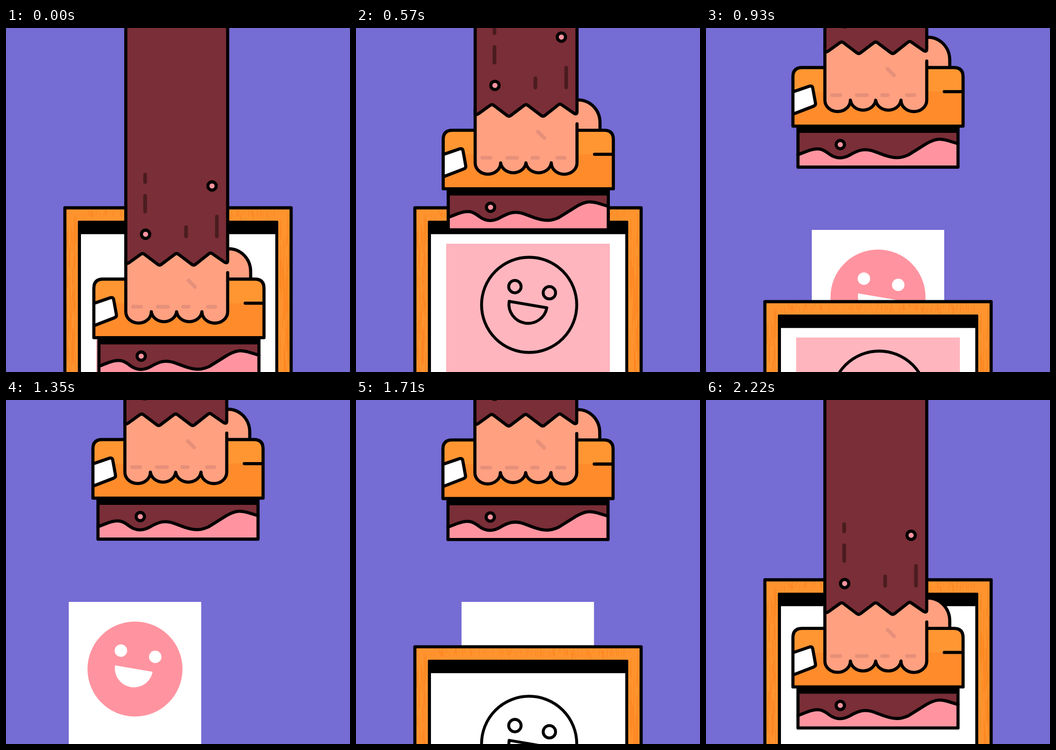
Recreate the animation shown at these times as an HTML page. Size 748x748 px, loop 2.25 s.

```html
<!DOCTYPE html>
<html lang="en">
<head>
<meta charset="utf-8">
<title>Screen printing</title>
<style>
  html, body { margin: 0; width: 100%; height: 100%; overflow: hidden; background: #756cd4; }
  svg { display: block; width: 100%; height: 100%; }
  .line { fill: none; stroke: #000; stroke-width: 6.8; stroke-linecap: round; stroke-linejoin: round; }
  .face { stroke-width: 6.3; }
  .dot { fill: #ff94a0; stroke: #000; stroke-width: 6.8; }
  .crease { fill: none; stroke-width: 8; stroke-linecap: round; }
</style>
</head>
<body>
<svg viewBox="0 0 748 748">
  <rect width="748" height="748" fill="#756cd4"/>

  <g id="print">
    <rect x="230" y="439" width="288" height="420" fill="#fff"/>
    <circle cx="374" cy="585" r="103.3" fill="#ff94a0"/>
    <g fill="#fff">
      <circle cx="343.3" cy="545" r="13.6"/>
      <circle cx="418" cy="558.5" r="13.6"/>
      <path d="M330.7 577L412.3 591A41.4 41.4 0 0 1 330.7 577Z"/>
    </g>
  </g>
  <rect id="blank" x="229.5" y="439" width="288" height="420" fill="#fff"/>

  <g id="frame">
    <rect x="128" y="391" width="492" height="900" fill="#ff942f"/>
    <path id="grain" fill="none" stroke="#fb7d16" stroke-opacity=".5" stroke-width="1.5"/>
    <rect class="line" x="128" y="391" width="492" height="900"/>
    <rect x="156.3" y="419" width="435.7" height="900" rx="2"/>
    <rect x="163" y="448.3" width="422.5" height="900" fill="#fff"/>
    <rect id="ink" x="196" y="469" width="356" height="900" fill="#ffb5bd"/>
    <g class="line face">
      <circle cx="376.5" cy="602" r="103.5"/>
      <circle cx="345.5" cy="562.3" r="13.5"/>
      <circle cx="420.5" cy="575.7" r="13.5"/>
      <path d="M333 594.3L415 608.3A41.6 41.6 0 0 1 333 594.3Z"/>
    </g>
  </g>

  <g id="hand">
    <!-- blade -->
    <rect x="200" y="216" width="348" height="86" fill="#7a2e37"/>
    <path id="wave" fill="#ff94a0"/>
    <path id="waveLine" class="line"/>
    <rect class="line" x="200" y="216" width="348" height="86.5"/>
    <rect x="197" y="213" width="354" height="15"/>
    <circle class="dot" cx="292" cy="253.5" r="9"/>

    <!-- thumb -->
    <path d="M470 20H480C508 20 530 42 530 70V92H470Z" fill="#ffa080"/>
    <path class="line" d="M482 20C509 20 530 42 530 70V86"/>

    <!-- handle -->
    <path d="M189 213V106Q189 86 209 86H539Q559 86 559 106V213Z" fill="#ff8b2b"/>
    <path d="M189 138.5V106Q189 86 209 86H539Q559 86 559 106V138.5Z" fill="#ff9632"/>
    <path class="line" style="fill:#fff" d="M190 138.5L225 126.5Q230.5 125 232 130L238 163Q239 168 234 170L190 187"/>
    <path class="line" d="M518 138.3H556M189 213.3V106Q189 86 209 86H539Q559 86 559 106V213.3Z"/>

    <!-- fist -->
    <path id="fist" fill="#ffa080"/>
    <path class="crease" stroke="#e6907a" d="M274 146H292M328 146H350M383 146H395M437 146H453M395 89L409 103"/>
    <path id="fistLine" class="line"/>

    <!-- sleeve -->
    <path id="sleeve" class="line" style="fill:#7a2e37"/>
    <path class="crease" stroke="#4a1c1f" d="M300.5-141V-125M300.5-95V-61M389.5-27V-7M456.5-50V-7"/>
    <circle class="dot" cx="446" cy="-116.5" r="9"/>
    <circle class="dot" cx="301.5" cy="-11.5" r="9"/>
  </g>
</svg>
<script>
const LOOP = 2250, STEP = 30;
const $ = id => document.getElementById(id);
const draw = (id, d) => $(id).setAttribute('d', d);
const move = (id, x, y) => $(id).setAttribute('transform', `translate(${x} ${y})`);
const ramp = (t, a, b) => Math.min(1, Math.max(0, (t - a) / (b - a)));

const wave = 'M200 275.5L222 267C245 259 254 263 268 274C283 285 297 285 313 276' +
  'C332 265 345 261 365 268L388 276.5C412 284.5 424 283 440 276L480 251C499 240.5 509 240 525 244.5L548 251.5';
draw('waveLine', wave);
draw('wave', wave + 'V302H200Z');

const knuckles = [314, 369, 424, 480].map(x => `A27.7 24.5 0 0 0 ${x} 157`).join('');
draw('fist', 'M258.5 20V157' + knuckles + 'V20Z');
draw('fistLine', 'M258.5 40V157' + knuckles + 'V72');
draw('sleeve', 'M258.5-540V52Q262 53 266 50L291 32Q295 29 299 32L328 54Q332 57 336 54L365 32Q369 29 373 32' +
  'L402 54Q406 57 410 54L439 31Q443 27.5 447 31L473 49Q480 53 480 46V-540');

// Wood grain: thin upright fibres along the two stiles and the top rail
let seed = 7;
const rand = () => (seed = seed * 16807 % 2147483647) / 2147483647;
const fibre = (x, y, len) => `M${x} ${y}q${rand() * 4 - 2} ${len / 2} 0 ${len}`;
let grain = '';
for (let i = 0; i < 100; i++) {
  grain += fibre(165 + rand() * 420, 395 + rand() * 10, 6 + rand() * 9);
  const side = i % 2 ? 133 : 595;
  grain += fibre(side + rand() * 20, 397 + rand() * 350, 20 + rand() * 50);
}
draw('grain', grain);

function render(t) {
  // The hand pulls up evenly, then drops with gathering speed
  const pull = 1 - ramp(t, 0, 810);
  const drop = ramp(t, 1680, LOOP) ** 2.1;
  const handY = 460 * (pull + drop);
  move('hand', 2 * pull, handY);

  move('frame', 0, 510 * (ramp(t, 810, 1110) - ramp(t, 1560, 1770)));
  $('ink').setAttribute('y', Math.max(469, handY + 218));
  $('ink').style.display = t < 1320 ? '' : 'none';

  const slide = 748 * ramp(t, 1320, 1560);
  move('print', -slide, 0);
  move('blank', 748 - slide, 0);
}

const start = performance.now();
function tick() {
  const t = (performance.now() - start) % LOOP;
  render(Math.floor(t / STEP) * STEP);
  requestAnimationFrame(tick);
}
render(0);
requestAnimationFrame(tick);
</script>
</body>
</html>
```
